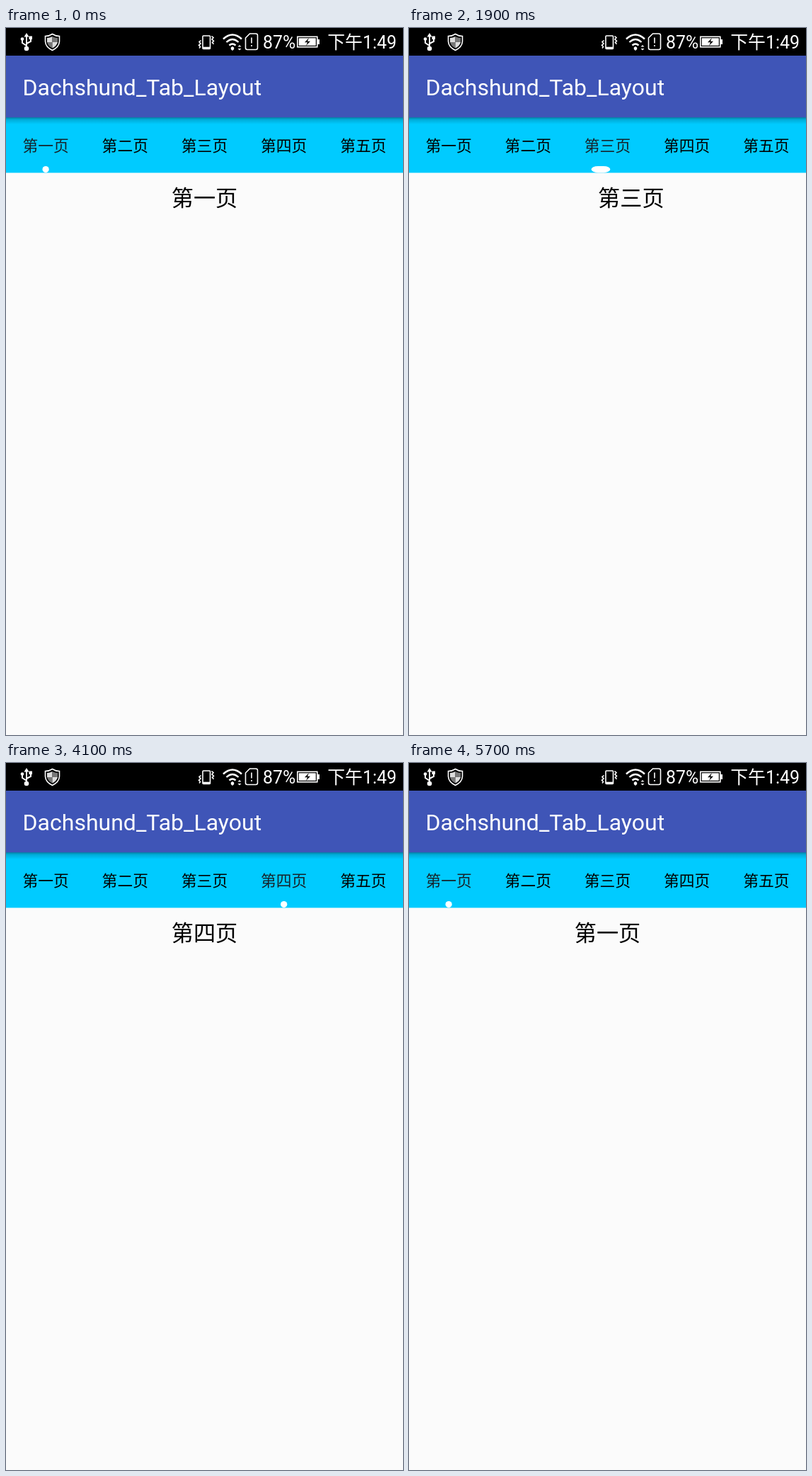
Animation of 561x998 px, one loop 5800 ms. Source, as an HTML page:

```html
<!DOCTYPE html>
<html lang="zh-CN">
<head>
<meta charset="utf-8">
<title>Dachshund_Tab_Layout</title>
<style>
  html, body { margin: 0; width: 100%; height: 100%; overflow: hidden; background: #fbfbfb; }
  svg { display: block; width: 561px; height: 998px; }
  text { font-family: Roboto, "Noto Sans CJK SC", "Noto Sans CJK", sans-serif; }
  .tab { font-size: 21.8px; text-anchor: middle; }
  .page { font-size: 31.2px; text-anchor: middle; }
  .status { font-size: 24.9px; fill: #fff; }
  .line { fill: none; stroke: #fff; }
</style>
</head>
<body>
<svg viewBox="0 0 561 998">
  <defs>
    <linearGradient id="shade" x2="0" y2="1">
      <stop offset="0" stop-opacity=".36"/>
      <stop offset=".35" stop-opacity=".15"/>
      <stop offset="1" stop-opacity="0"/>
    </linearGradient>
  </defs>
  <rect width="561" height="998" fill="#fbfbfb"/>
  <g id="pages"></g>

  <rect y="126" width="561" height="78.4" fill="#00cbff"/>
  <rect y="126" width="561" height="10" fill="url(#shade)"/>
  <g id="tabs"></g>
  <rect id="bar" y="194.9" height="9.3" rx="9.3" ry="4.65" fill="#fff"/>

  <rect y="39" width="561" height="87.2" fill="#3f55b7"/>
  <text x="23.6" y="95" font-size="32" fill="#fff">Dachshund_Tab_Layout</text>

  <rect width="561" height="39" fill="#000"/>
  <!-- USB -->
  <g class="line" stroke-width="2">
    <path d="M29 11V28M29 25L23 21V16M29 22L35 19V14"/>
    <path fill="#fff" stroke="none" d="M29 7l3.5 5.5h-7zM32.5 11.5h4.5v4.5h-4.5z"/>
    <circle cx="23" cy="15.5" r="2.3" fill="#fff" stroke="none"/>
    <circle cx="29" cy="29" r="3.3" fill="#fff" stroke="none"/>
  </g>
  <!-- shield -->
  <path d="M65.5 8.5Q70 11.5 75.5 11.5V19Q75 27 65.5 31.5Q56 27 55.5 19V11.5Q61 11.5 65.5 8.5Z" class="line" stroke-width="1.6"/>
  <path d="M65.500 12Q62 14 58 14V20H65.500Z" fill="#ddd"/>
  <path d="M65.500 12Q69 14 73 14V20H65.500Z" fill="#777"/>
  <path d="M65.500 20V28.500Q59 25 58 20Z" fill="#777"/>
  <path d="M65.500 20V28.500Q72 25 73 20Z" fill="#ddd"/>
  <!-- vibrating phone -->
  <g class="line" stroke-width="1.6">
    <rect x="278" y="11" width="10.5" height="18.5" rx="1"/>
    <path d="M278 28.2H288.5" stroke-width="3"/>
    <path d="M290.5 11.5l2.5 2.2-2 2.3 2.5 2.3-2 2.2 2 2.3M275.5 17.5l-2.5 2.2 2 2.3-2.5 2.3 2 2.2-1.5 2"/>
  </g>
  <!-- Wi-Fi -->
  <g class="line" stroke-width="2.4">
    <path d="M307 15.5Q320 3.5 333 15.5M311.5 20Q320 12 328.5 20M315.5 24.5Q320 20.5 324.5 24.5"/>
    <path fill="#fff" stroke="none" d="M317.8 27.5l2.2-1.5 2.2 1.5v2.5l-2.2 2-2.2-2zM327.5 26.5l2.5-2.5 2.5 2.5zM327.5 29l2.5 2.5 2.5-2.5z"/>
  </g>
  <!-- SIM card -->
  <path class="line" stroke-width="1.6" d="M344.5 8H353Q355.5 8 355.5 10.5V28Q355.5 30.5 353 30.5H341Q338.5 30.5 338.5 28V14Z"/>
  <path class="line" stroke-width="1.6" d="M347 13.5V21.5M347 24V26"/>
  <!-- battery -->
  <rect class="line" x="411.8" y="12.3" width="28" height="14.5" stroke-width="1.6"/>
  <rect x="413.8" y="14.3" width="24" height="10.5" fill="#fff"/>
  <rect x="440" y="16" width="3" height="7" fill="#fff"/>
  <path d="M428 14L422 20.3H426L424 25L430 18.8H426Z"/>

  <text class="status" x="363" y="28.5">87%</text>
  <text class="status" x="552" y="28.5" text-anchor="end">下午1:49</text>
</svg>
<script>
const LOOP = 5800, STEP = 100, WIDTH = 561, TAB = WIDTH / 5, DOT = 9.3;
const DRAGGED = 0.4, LAG = 46;

// A tap has no drag; a swipe drags part of the way, then settles.
const moves = [
  { start: 365, drag: 0, settle: 600, from: 0, to: 1 },
  { start: 1363, drag: 167, settle: 1000, from: 1, to: 2 },
  { start: 2595, drag: 298, settle: 1150, from: 2, to: 3 },
  { start: 4298, drag: 0, settle: 1200, from: 3, to: 0 }
];

const $ = id => document.getElementById(id);

function addText(parent, cls, x, y, label) {
  const el = document.createElementNS("http://www.w3.org/2000/svg", "text");
  el.setAttribute("class", cls);
  el.setAttribute("x", x);
  el.setAttribute("y", y);
  el.textContent = label;
  return parent.appendChild(el);
}

const labels = [..."一二三四五"].map(n => `第${n}页`);
const tabs = labels.map((s, i) => addText($("tabs"), "tab", (i + 0.5) * TAB, 174, s));
const pages = labels.map(s => addText($("pages"), "page", 0, 251.3, s));

const currentMove = t => moves.filter(m => t >= m.start).pop();

function position(t, lag = 0) {
  const m = currentMove(t);
  if (!m) return 0;
  const since = t - m.start - m.drag;
  const held = m.drag ? DRAGGED : 0;
  let p;
  if (since < 0) {
    p = held * (1 + since / m.drag) ** 2;
  } else {
    const s = Math.min(1, Math.max(0, since - lag) / m.settle);
    p = 1 - (1 - held) * (1 - s) ** 5;
  }
  return m.from + (m.to - m.from) * p;
}

function selected(t) {
  const m = currentMove(t);
  if (!m) return 0;
  return t >= m.start + m.drag ? m.to : m.from;
}

function draw(t) {
  const pos = position(t), sel = selected(t);
  pages.forEach((el, i) => el.setAttribute("x", WIDTH / 2 + (i - pos) * WIDTH));
  tabs.forEach((el, i) => el.setAttribute("fill", i === sel ? "#16242c" : "#000"));

  // The left edge accelerates while the right edge decelerates.
  const at = position(t, LAG), base = Math.floor(at), f = at - base;
  const left = (base + 0.5 + f * f) * TAB - DOT / 2;
  const right = (base + 0.5 + 1 - (1 - f) ** 2) * TAB + DOT / 2;
  $("bar").setAttribute("x", left);
  $("bar").setAttribute("width", right - left);
}

function tick() {
  const t = performance.now() % LOOP;
  draw(Math.floor(t / STEP) * STEP);
  requestAnimationFrame(tick);
}
tick();
</script>
</body>
</html>
```
